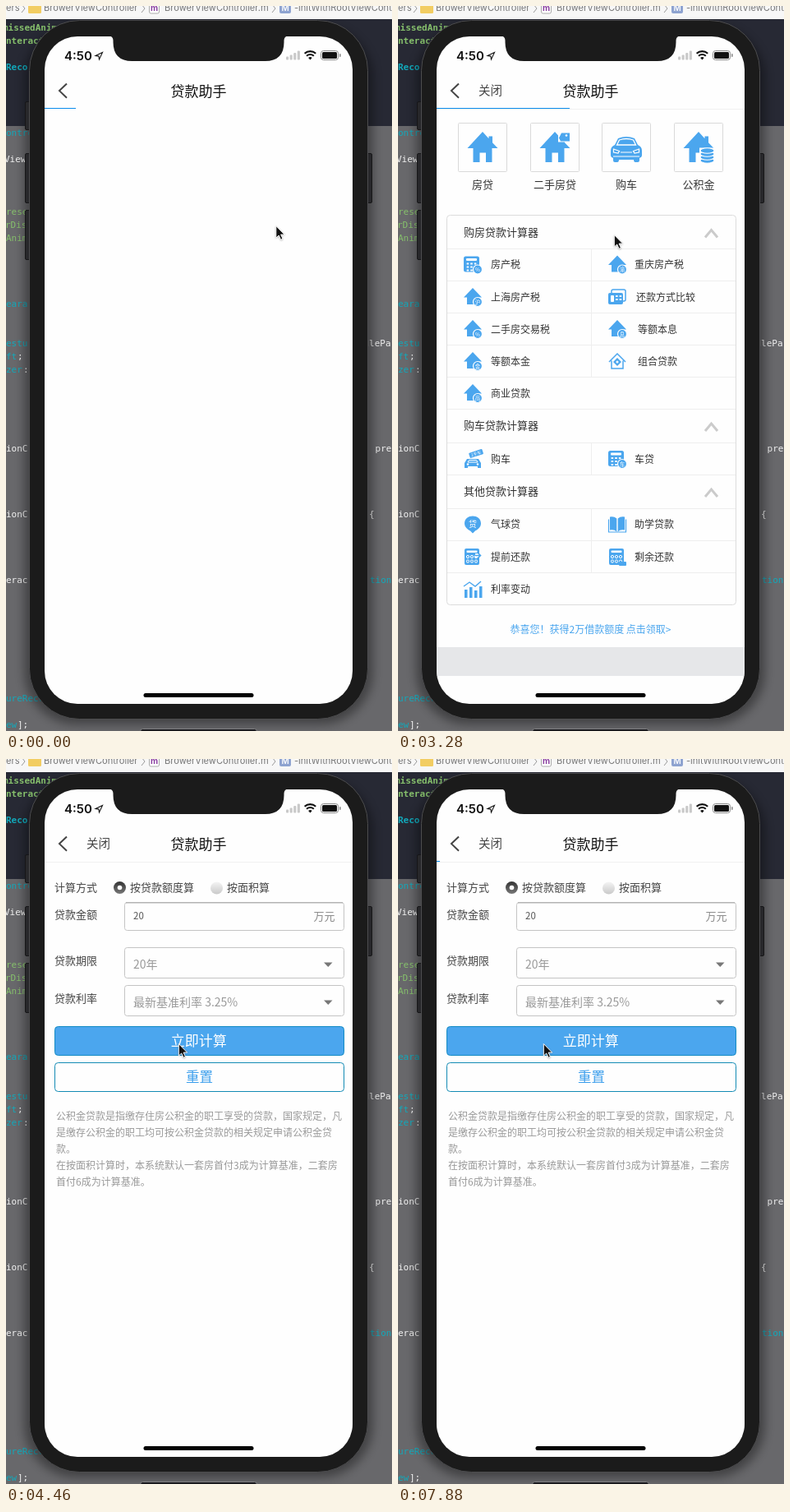
An HTML page for the animation above (8000 ms loop, 470x882 px).

```html
<!DOCTYPE html>
<html lang="zh-CN">
<head>
<meta charset="utf-8">
<title>贷款助手</title>
<style>
html, body { margin: 0; width: 100%; height: 100%; overflow: hidden; background: #68686b; }
svg { display: block; }
text { font-family: "Noto Sans CJK SC", "Noto Sans CJK", "Noto Sans", sans-serif; white-space: pre; }
.mono { font-family: "DejaVu Sans Mono", monospace; font-size: 11px; }
.ui { font-family: Inter, "Liberation Sans", sans-serif; }
</style>
</head>
<body>
<svg id="stage" width="470" height="882" viewBox="0 0 470 882">
  <defs>
    <filter id="blur" x="-20%" y="-20%" width="140%" height="140%"><feGaussianBlur stdDeviation="6"/></filter>
    <filter id="soft" x="-60%" y="-60%" width="240%" height="240%"><feGaussianBlur stdDeviation="1.2"/></filter>
    <clipPath id="screen"><rect x="47" y="37" width="375" height="812" rx="40"/></clipPath>
    <linearGradient id="on" x2="0" y2="1"><stop stop-color="#333"/><stop offset="1" stop-color="#777"/></linearGradient>
    <linearGradient id="off" x2="0" y2="1"><stop stop-color="#f4f4f4"/><stop offset="1" stop-color="#c9c9c9"/></linearGradient>
  </defs>
  <g id="desk"></g>
  <g id="phone"></g>
  <g clip-path="url(#screen)">
    <rect x="47" y="37" width="375" height="812" fill="#fefefe"/>
    <g id="home"></g>
    <g id="form"></g>
    <g id="nav"></g>
    <rect id="bar" x="47" y="124" height="1" fill="#0a8cec"/>
  </g>
  <g id="status"></g>
  <g id="cursor">
    <path d="M0 1v15l3.600-3 2.500 5.400 2.600-1.200-2.400-5.200h5z" fill="#000" opacity=".35" filter="url(#soft)"/>
    <path d="M.3 .5v14.600l3.400-3.100 2.400 5.300 2.400-1.100-2.400-5.100h4.600z" fill="#111" stroke="#fff"/>
  </g>
</svg>
<script>
const $ = id => document.getElementById(id);
const BLUE = '#4ba6ee';

const text = (x, y, s, size, fill, more = '') =>
  `<text x="${x}" y="${y}" font-size="${size}" fill="${fill}" ${more}>${s}</text>`;
const mid = (x, y, s, size, fill, more = '') =>
  text(x, y, s, size, fill, 'text-anchor="middle" ' + more);
const rect = (x, y, w, h, fill, rx = 0, more = '') =>
  `<rect x="${x}" y="${y}" width="${w}" height="${h}" rx="${rx}" fill="${fill}" ${more}/>`;
const box = (x, y, w, h, stroke, rx = 0, fill = 'none') =>
  rect(x + .5, y + .5, w - 1, h - 1, fill, rx, `stroke="${stroke}"`);
const fillPath = (d, fill = BLUE) => `<path d="${d}" fill="${fill}"/>`;
const line = (d, stroke = BLUE, w = 1.5) =>
  `<path d="${d}" fill="none" stroke="${stroke}" stroke-width="${w}"/>`;
const at = (x, y, body, turn = 0) => `<g transform="translate(${x} ${y}) rotate(${turn})">${body}</g>`;
const dot = (x, y, r, fill, more = '') => `<circle cx="${x}" cy="${y}" r="${r}" fill="${fill}" ${more}/>`;

// Editor behind the phone
function desk() {
  const green = '#86c06c', cyan = '#12a9bb', white = '#f2f2f2';
  const code = (x, y, s, c, bold) => text(x, y + 4, s, 11, c, `class="mono"${bold ? ' font-weight="700"' : ''}`);
  const sep = x => line(`M${x} -2l4 5-4 5`, '#999', 1);
  const crumb = (x, s) => text(x, 6, s, 11.1, '#777', 'class="ui"');
  const rows = [
    [154, 'ontro', cyan], [186, 'ViewC', white, -2], [250, 'rese', green], [266, 'rDism', green, -1],
    [282, 'Anim', green], [362, 'eara', cyan], [410, 'estu', cyan], [426, 'ft', cyan], [442, 'zer', cyan],
    [538, 'ionC', white], [618, 'ionC', white], [698, 'erac', white], [842, 'ureReco', cyan], [874, 'ew', cyan],
    [426, ';', white, 14], [442, ':', white, 21], [874, '];', white, 14],
    [410, 'dlePa', white, 435.5], [538, ' pre', white, 443], [618, '{', white, 442], [698, 'tion', cyan, 443]
  ];
  return rect(0, 0, 470, 882, '#68686b') + rect(0, 16, 470, 130, '#272934') + rect(0, 0, 470, 16, '#f7f7f7') +
    crumb(0, 'ers') + sep(19) + rect(27, -2, 16, 11, '#f2cd62', 1.5) + crumb(46, 'BrowerViewController') + sep(165) +
    rect(174.5, -4, 12, 13, '#fff', 2, 'stroke="#aaa"') + mid(180.5, 6, 'm', 10, '#8a3fa0', 'class="ui" font-weight="700"') +
    crumb(193, 'BrowerViewController.m') + sep(324) + rect(333, -4, 14, 13, '#8ea3d0', 2) +
    mid(340, 6, 'M', 10, '#fff', 'class="ui" font-weight="600"') + crumb(351, '-initWithRootViewController') +
    code(-4, 26, 'missedAnim', green, 1) + code(0, 42, 'nteract', green, 1) + code(0, 74, 'Reco', cyan, 1) +
    rows.map(([y, s, c, x = 0]) => code(x, y, s, c)).join('') +
    rect(163.5, 879.5, 142, 10, '#1b1b1f', 3, 'stroke="#8a8a8c"');
}

function phone() {
  const button = (x, y, h) => rect(x + .5, y + .5, 6, h - 1, '#28282b', 1.5, 'stroke="#161618"');
  return rect(22, 24, 425, 850, '#000', 64, 'opacity=".36" filter="url(#blur)"') +
    button(23, 116, 35) + button(23, 179, 61) + button(23, 248, 61) + button(439, 179, 61) +
    rect(28.5, 17.5, 412, 850, '#1b1b1b', 61, 'stroke="#4c4c4e"');
}

function status() {
  const bars = [4, 6, 8.5, 11].map((h, i) => rect(341 + i * 4.6, 65.5 - h, 3.1, h, '#c9c9c9', 1)).join('');
  const wifi = line('M363.6 57.8a10 10 0 0 1 13.6 0M366 60.7a6.4 6.4 0 0 1 8.8 0', '#111', 2.1) +
    fillPath('M370.4 65.6l-2.3-2.6a3.3 3.3 0 0 1 4.6 0z', '#111');
  return fillPath('M125 36q5.500 1 5.500 6v2q0 23 23 23h162q23 0 23-23v-2q0-5 5.500-6z', '#1b1b1b') +
    text(71, 65.5, '4:50', 15, '#111', 'class="ui" font-weight="600"') +
    line('M109 60.500l8.500-4-4 8.500-.6-3.900z', '#111', 1.1) + bars + wifi +
    box(383, 54, 22, 12, '#888', 3) + rect(385, 56, 18, 8, '#111', 1.5) + rect(406, 58, 1.6, 4, '#888', .8) +
    rect(167.5, 836, 134, 5, '#000', 2.5);
}

const nav = () =>
  line('M74 94.500l-9 8.600 9 8.600', '#444', 2) +
  mid(234.5, 109.5, '贷款助手', 17, '#111', 'font-weight="500"') +
  `<g id="close">${text(98, 108.2, '关闭', 14.5, '#444') + rect(47, 125, 375, 1, '#f0f0f0')}</g>`;

// Icons: large ones sit in a 40 unit box, small ones in a 22 unit box
const house = fillPath('M20 .5L1.500 20.500h7v17h8V26H24v11.500h7.500v-17h7L32 13.800V6h-4.500v2.800z');
const badge = s => dot(17, 17, 5.5, BLUE, 'stroke="#fff" stroke-width="1.2"') + mid(17, 19.5, s, 6.5, '#fff');
const tinyHouse = s => fillPath('M11 0L0 11.500h4V20h14v-8.500h4z') + badge(s);
const dots = (x, y, cols, rows) => {
  let out = '';
  for (let i = 0; i < cols * rows; i++)
    out += rect(x + i % cols * 4.6, y + (i / cols | 0) * 4, 2.6, 2, '#fff', .5);
  return out;
};
const calc = rect(0, 1, 19, 19, BLUE, 2.5) + rect(3, 3.5, 13, 3, '#fff', 1) + dots(3.6, 9, 3, 3);
const pad = rect(1, 1, 18, 20, BLUE, 2) + rect(3.5, 3.5, 13, 2.5, '#fff', 1) +
  [0, 1, 2, 3, 4, 5].map(i => dot(5 + i % 3 * 5, 11 + (i / 3 | 0) * 5.5, 1.6, BLUE, 'stroke="#fff"')).join('');

const big = {
  house,
  resale: house + rect(24, 0, 16, 13, '#fefefe') + fillPath('M25 8l3-6h10v10H27z') + dot(34, 5, 1.3, '#fff'),
  car: fillPath('M10 5Q20 1 30 5l4 8q5 2 5 7v6q0 2-3 3v3q0 2-2 2h-3q-2 0-2-3H11q0 3-2 3H6q-2 0-2-2v-3q-3-1-3-3v-6q0-5 5-7z') +
    line('M11.500 7Q20 4 28.500 7l3 6h-23z', '#fff', 1.3) +
    line('M4.500 18l7 2.500-1.500 2.500-5.500-1zM35.500 18l-7 2.500 1.500 2.500 5.500-1zM13 22h14M4 27h32', '#fff', 1.2),
  coins: house + rect(21, 20, 19, 20, '#fefefe') + [0, 1, 2, 3].map(i =>
    `<ellipse cx="30.5" cy="${35.5 - i * 4}" rx="8.5" ry="3.3" fill="${BLUE}" stroke="#fff" stroke-width="1.1"/>`).join('')
};

const small = {
  tax: calc + badge('%'),
  cards: rect(4, 2, 17, 14, 'none', 2, `stroke="${BLUE}" stroke-width="1.5"`) + rect(0, 6, 18, 14, BLUE, 2) +
    rect(3, 9, 4, 8, '#fff', 1) + dots(9, 9, 2, 2),
  combo: line('M1 12L11 2l10 10M4 10.500V20h14v-9.500') + fillPath('M11 7l5 5-5 5-5-5z') + dot(11, 12, 1.5, '#fff'),
  car: fillPath('M4 11h14l3 5v6h-4v-2H5v2H1v-6z') + line('M5 15l1.500-2.500h9L17 15z', '#fff', 1) +
    dot(5, 17.5, 1.2, '#fff') + dot(17, 17.5, 1.2, '#fff') +
    at(6, 4, rect(0, 0, 17, 6.5, BLUE, 1) + mid(8.5, 5.2, '2手车', 5, '#fff'), -18),
  carLoan: calc + badge('车'),
  balloon: fillPath('M11 1C16 1 21 4 21 10c0 5-5 8-7 9l-3 3-3-3C6 18 1 15 1 10 1 4 6 1 11 1z') + mid(11, 14, '贷', 10, '#fff'),
  book: fillPath('M2 2q5-1 8.300 2v16q-3-3-8.300-2zM20 2q-5-1-8.300 2v16q3-3 8.300-2z') + line('M.5 5v15.500h21V5', BLUE, 1.2),
  early: pad + rect(14, 7, 8, 5, '#fefefe') + line('M14 9.500h6M17.500 6.500l3 3-3 3', BLUE, 1.6),
  rest: pad + rect(13, 17, 9, 5, BLUE, 1),
  chart: [[1, 12], [7, 9], [13, 13], [19, 8]].map(([x, y]) => rect(x, y, 3.5, 22 - y, BLUE)).join('') +
    line('M0 8l7-5 7 5 7-6', BLUE, 1.4)
};

function home() {
  const tiles = [['房贷', 'house'], ['二手房贷', 'resale'], ['购车', 'car'], ['公积金', 'coins']];
  const heads = [[275, '购房贷款计算器'], [510.5, '购车贷款计算器'], [590.5, '其他贷款计算器']];
  const cells = [
    [314.5, '房产税', small.tax, '重庆房产税', tinyHouse('渝')],
    [354, '上海房产税', tinyHouse('沪'), '还款方式比较', small.cards, 290],
    [393, '二手房交易税', tinyHouse('%'), '等额本息', tinyHouse('息'), 292],
    [432, '等额本金', tinyHouse('金'), '组合贷款', small.combo, 292],
    [471, '商业贷款', tinyHouse('商')],
    [551, '购车', small.car, '车贷', small.carLoan],
    [630.5, '气球贷', small.balloon, '助学贷款', small.book],
    [670, '提前还款', small.early, '剩余还款', small.rest],
    [709, '利率变动', small.chart]
  ];
  const rules = [295, 334, 373, 412, 451, 490, 531, 570, 611, 650, 689];
  return tiles.map(([s, icon], i) => {
    const x = Math.round(73 + i * 87.6);
    return box(x, 142, 60, 60, '#dadada', 1) + at(x + 10, icon === 'car' ? 156 : 152.5, big[icon]) + mid(x + 30, 222, s, 13, '#333');
  }).join('') +
    box(59, 254, 353, 475, '#dcdcdc', 4) +
    rules.map(y => rect(60, y, 351, 1, '#eeeeee')).join('') +
    [[295, 156], [531, 39], [611, 78]].map(([y, h]) => rect(235, y, 1, h, '#eeeeee')).join('') +
    heads.map(([y, s]) => text(80, y + 4.5, s, 13, '#333') + line(`M374 ${y + 6.5}l7.500-9 7.500 9`, '#cbcbcb', 3)).join('') +
    cells.map(([y, a, ia, b, ib, x = 288]) =>
      text(113, y + 4.5, a, 12, '#333') + at(80, y - 11, ia) +
      (b ? text(x, y + 4.5, b, 12, '#333') + at(256, y - 11, ib) : '')).join('') +
    mid(234.5, 763, '恭喜您！获得2万借款额度 点击领取&gt;', 12, BLUE) +
    rect(47, 780, 375, 35, '#e6e7e9');
}

function form() {
  const label = (y, s) => text(59, y + 4.7, s, 13, '#444');
  const drop = (y, s, id = '') => box(144, y, 268, 38, '#c4c4c4', 3) +
    text(155, y + 25.5, s, 14, '#999', id && `id="${id}"`) + fillPath(`M387 ${y + 18.5}h10.500l-5.250 5.500z`, '#777');
  const note = ['公积金贷款是指缴存住房公积金的职工享受的贷款，国家规定，凡', '是缴存公积金的职工均可按公积金贷款的相关规定申请公积金贷', '款。',
    '在按面积计算时，本系统默认一套房首付3成为计算基准，二套房', '首付6成为计算基准。'];
  return label(156.5, '计算方式') + label(189.5, '贷款金额') + label(245.5, '贷款期限') + label(291.5, '贷款利率') +
    dot(138.5, 156.5, 7.5, 'url(#on)') + dot(138.5, 156.5, 2.8, '#fff') + text(151, 161.2, '按贷款额度算', 13, '#444') +
    dot(256.5, 157, 7.5, 'url(#off)') + text(269, 161.2, '按面积算', 13, '#444') +
    box(144, 174, 268, 35, '#c4c4c4', 3) + rect(146, 174, 264, 1.5, '#b4b4b4') +
    text(155, 195, '20', 11.5, '#555') + text(374.5, 196, '万元', 13, '#888') +
    drop(229, '20年') + drop(275, '最新基准利率 3.25%', 'rate') +
    '<g id="lower">' + box(59, 325, 353, 36, '#138bc4', 4, BLUE) + mid(234.8, 349, '立即计算', 17, '#fff') +
    box(59, 369, 353, 36, '#138bb4', 4, '#fefefe') + mid(235.5, 393, '重置', 16.5, '#3d9fec') +
    note.map((s, i) => text(61, 439.2 + i * 20, s, 12, '#999')).join('') + '</g>';
}

for (const draw of [desk, phone, home, form, nav, status]) $(draw.name).innerHTML = draw();

// [start ms, value...]; every value holds until the next start
const LOOP = 8000;
const progress = [[0, 38], [450, 88], [600, 145], [750, 188], [1340, 225], [1490, 250], [1640, 263],
  [2680, 4], [2830, 38], [2980, 75], [3130, 118], [3280, 162], [3430, 229], [3570, 375], [3720, 0], [7880, 4]];
const pointer = [[0, 328.5, 267], [2090, 350, 208], [2230, 369, 157], [2980, 345, 185], [3130, 295, 240], [3280, 263, 278],
  [4020, 258, 286], [4170, 236, 318], [4310, 217, 340], [4460, 210, 346], [5660, 150, 440], [5810, 107, 516],
  [6110, 92, 518], [6250, 78, 516], [6550, 103, 482], [6700, 148, 415], [6850, 178, 368], [7000, 178, 360],
  [7150, 177, 351], [7290, 177, 346]];
const pick = (steps, t) => steps.findLast(s => s[0] <= t);
const show = (id, on) => $(id).style.display = on ? '' : 'none';

function frame() {
  const t = performance.now() % LOOP;
  const [, x, y] = pick(pointer, t);
  $('bar').setAttribute('width', pick(progress, t)[1]);
  $('cursor').setAttribute('transform', `translate(${x} ${y})`);
  show('home', t >= 1340 && t < 3430);
  show('form', t >= 3430);
  show('close', t >= 2980);
  show('rate', t >= 3570);
  $('lower').setAttribute('transform', `translate(0 ${t < 3570 ? 5 : 0})`);
  requestAnimationFrame(frame);
}
frame();
</script>
</body>
</html>
```
